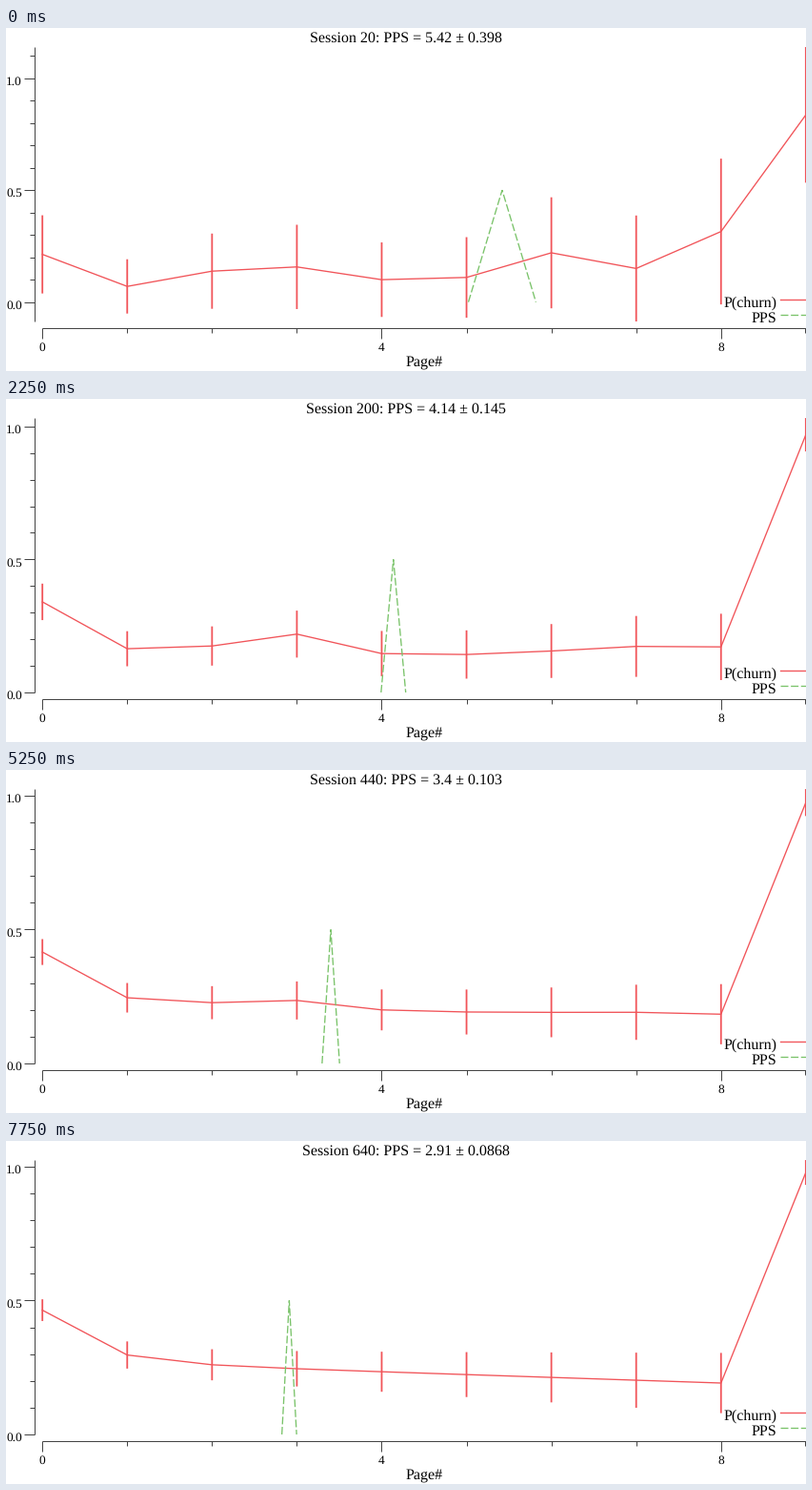
A matplotlib script that plays this animation: 840x360 px, repeating every 8000 ms.

```python
import numpy as np
import matplotlib.pyplot as plt
from matplotlib.animation import FuncAnimation
from matplotlib.collections import LineCollection

W, H, DPI = 840, 360, 80
PT = 72 / DPI                     # points per pixel
RED, GREEN, INK = "#f15459", "#7ac36a", "#444444"
TOP, BOTTOM = 20, 308
AXIS_X, AXIS_Y = 30, 315
FRAMES, INTERVAL, STEP = 32, 250, 20
PAGES = np.arange(10)

plt.rcParams["font.family"] = "Liberation Serif"
plt.rcParams["text.hinting"] = "none"

# Pages per session and its spread at a few sessions
KEYS = np.array([20, 140, 260, 360, 440, 560, 640])
PPS = [5.42, 4.45, 3.87, 3.6, 3.4, 3.1, 2.91]
PPS_ERR = np.array([0.398, 0.168, 0.13, 0.113, 0.103, 0.0926, 0.0868])

# Churn per page: two early estimates settle into a smooth decay
FIRST = [.213, .07, .138, .157, .1, .11, .22, .15, .315, .836]
EARLY = [.315, .137, .157, .214, .128, .126, .144, .167, .167, .967]
LATE = .276 - .0105 * PAGES + .188 * np.exp(-1.8 * PAGES)
LATE[-1] = .978


def page_x(page):
    return 38.2 + 89.07 * np.asarray(page)


def churn_stats(session):
    """Mean and standard error of a Beta estimate on every page."""
    at = np.sqrt(session)
    mean = np.array([np.interp(at, np.sqrt([20, 140, 640]), stops)
                     for stops in zip(FIRST, EARLY, LATE)])
    seen = [.8 + .235 * session]
    for m in mean[:-1]:
        seen.append(seen[-1] * (1 - m) + .1)      # those who stay read on
    return mean, np.sqrt(mean * (1 - mean) / np.array(seen))


def pps_stats(session):
    pps = np.interp(np.sqrt(session), np.sqrt(KEYS), PPS)
    return pps, np.interp(session, KEYS, PPS_ERR ** -2) ** -0.5


fig = plt.figure(figsize=(W / DPI, H / DPI), dpi=DPI, facecolor="white")
ax = fig.add_axes([0, 0, 1, 1])
ax.set(xlim=(0, W), ylim=(H, 0))
ax.axis("off")


def label(x, y, text, px=16, ha="center"):
    return ax.text(x, y, text, fontsize=px * PT, ha=ha, va="baseline",
                   color="black")


def strokes(segments, color, px, snap):
    lines = LineCollection(segments, colors=color, linewidths=px * PT)
    lines.set_snap(snap)
    return ax.add_collection(lines, autolim=False)


def curve(x, y, color, dashed=False):
    style = (0, (6, 2)) if dashed else "-"
    return ax.plot(x, y, color=color, lw=1.33 * PT, ls=style,
                   solid_joinstyle="miter", dash_joinstyle="miter")[0]


# Fixed axes, labels and legend
axis_lines = [[(AXIS_X, TOP), (AXIS_X, BOTTOM)],
              [(page_x(0), AXIS_Y), (W, AXIS_Y)]]
for page in PAGES:
    x = min(page_x(page), W - 1)
    major = page % 4 == 0
    axis_lines.append([(x, AXIS_Y), (x, AXIS_Y + (10.7 if major else 5.3))])
    if major:
        label(x, 339, str(page), 13.33)
strokes(axis_lines, INK, 1, True)
label(439, 355, "Page#")

bars = strokes([], RED, 1.8, False)
churn = curve([], [], RED)
peak = curve([], [], GREEN, True)
ticks = strokes([], INK, 1, True)
title = label(W / 2, 15, "")
tick_labels = [(v, label(0, 0, f"{v:.1f}", 13.33, "left"))
               for v in (0, 0.5, 1)]

for name, base, y, color, dashed in [("P(churn)", 292.4, 285, RED, False),
                                     ("PPS", 309, 301, GREEN, True)]:
    label(809.5, base, name, ha="right")
    curve([813, W], [y, y], color, dashed)


def draw(i):
    session = STEP * (i + 1)
    mean, err = churn_stats(session)
    pps, pps_err = pps_stats(session)
    low = min(0, (mean - err).min())
    high = (mean + err).max()

    def y_of(v):
        return BOTTOM - (np.asarray(v) - low) / (high - low) * (BOTTOM - TOP)

    xs = page_x(PAGES)
    churn.set_data(xs, y_of(mean))
    bars.set_segments([[(x, a), (x, b)] for x, a, b in
                       zip(xs, y_of(mean - err), y_of(mean + err))])
    peak.set_data(page_x([pps - pps_err, pps, pps + pps_err]),
                  y_of([0, 0.5, 0]))

    marks = []
    for n in range(12):
        if n / 10 <= high:
            y = y_of(n / 10)
            marks.append([(AXIS_X - (5.3 if n % 5 else 10.7), y), (AXIS_X, y)])
    ticks.set_segments(marks)
    for v, text in tick_labels:
        text.set_y(y_of(v) + 7)
    title.set_text(f"Session {session}: PPS = {pps:.3g} ± {pps_err:.3g}")
    return churn, bars, peak, ticks, title


anim = FuncAnimation(fig, draw, frames=FRAMES, interval=INTERVAL,
                     repeat=True, repeat_delay=0, blit=False)
plt.show()
```
